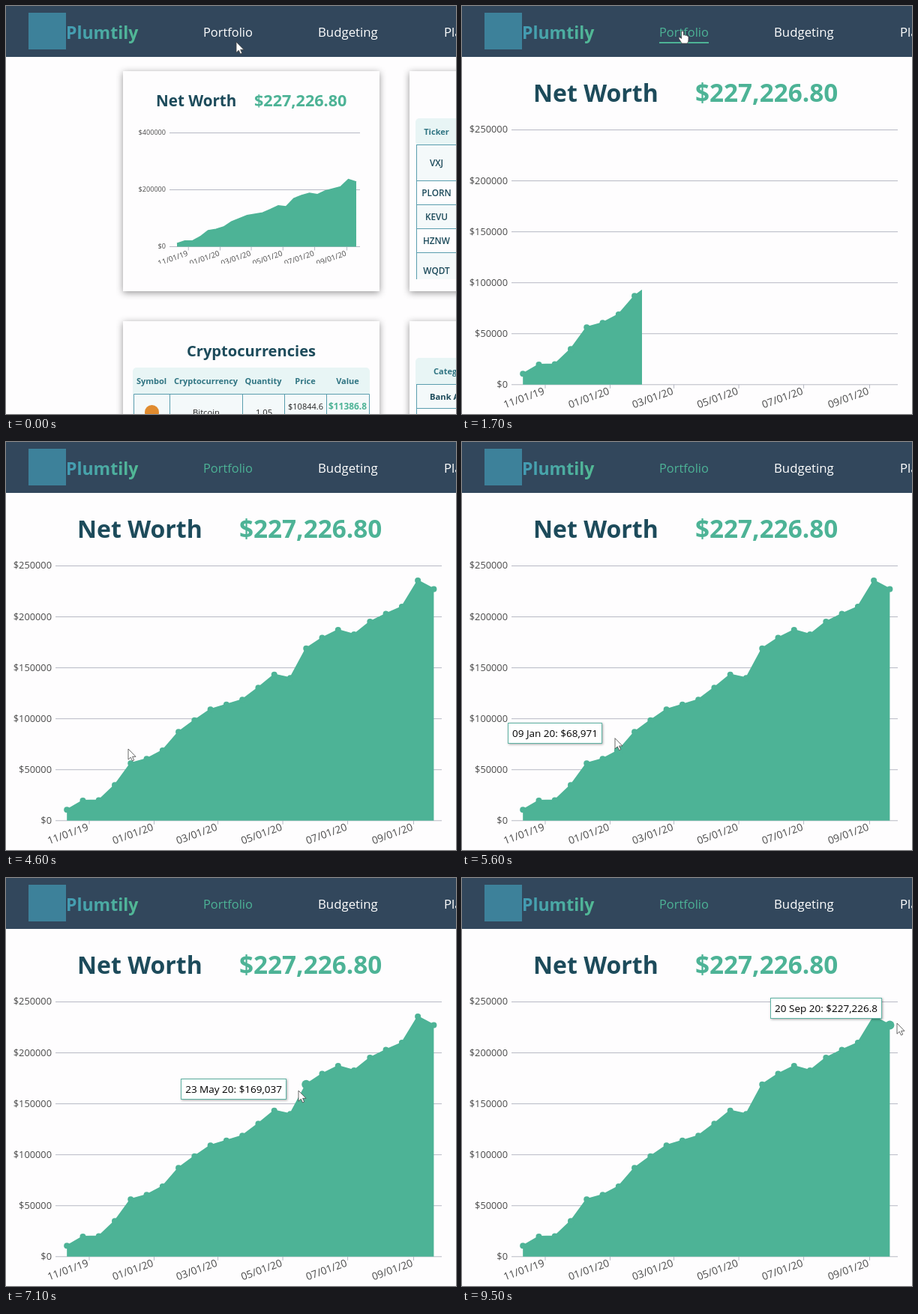
These frames come from a looping animation (600x545 px, 9.6 s). An HTML page:

```html
<!DOCTYPE html>
<html lang="en">
<head>
<meta charset="utf-8">
<title>Net worth dashboard</title>
<style>
  html, body { margin: 0; width: 100%; height: 100%; overflow: hidden; background: #fefdfe; }
  #stage { position: relative; width: 600px; height: 545px; overflow: hidden;
    font-family: "Open Sans", "Noto Sans", sans-serif; }
  svg { position: absolute; left: 0; top: 0; }
  .card { filter: drop-shadow(0 2px 5px rgba(0, 0, 0, .42)); }
  #tip { position: absolute; box-sizing: border-box; height: 28px; padding: 0 5px;
    border: 1px solid #5fb3a4; background: #fff; box-shadow: 1px 1px 3px rgba(0, 0, 0, .35);
    font-size: 13.5px; line-height: 26px; color: #000; white-space: nowrap; }
  #pointer path { fill: #fff; stroke: #444; stroke-width: .8; }
</style>
</head>
<body>
<div id="stage">
  <svg id="page" width="600" height="545"></svg>
  <div id="tip"></div>
  <svg id="pointer" width="600" height="545">
    <path id="arrow" d="M0 0V14.2L3.3 11.2 5.5 16 7.7 15 5.6 10.3H10Z"/>
    <path id="hand" d="M-1.3 1.2Q0-.6 1.4 1.2V6Q3 5 4 6.3 5.4 5.6 6.2 7 8 6.7 8 8.6V12Q8 14.5 6.5 17H-1Q-2.5 14-4.6 11 -5.8 9 -4 8.7L-1.3 10.4Z"/>
  </svg>
</div>
<script>
const LOOP = 9600, STEP = 100;
const PAPER = '#fefdfe', GREEN = '#4db396', DARK = '#1d4b5b', TEAL = '#2f7482', GRID = '#b7b9c4', LINE = '#5a9dae';
const $ = id => document.getElementById(id);

const worth = [10662, 19706, 20000, 34926, 56250, 60662, 68971, 87132, 98529, 109191, 113888, 118750,
  130515, 143382, 140074, 169037, 179412, 187132, 182721, 195221, 202941, 209926, 235662, 227226.8];
// Days from the first sample to each labelled month
const ticks = { '11/01/19': 22, '01/01/20': 83, '03/01/20': 143, '05/01/20': 204, '07/01/20': 265, '09/01/20': 327 };
const months = 'Jan Feb Mar Apr May Jun Jul Aug Sep Oct Nov Dec'.split(' ');

const big = { x: 81.2, gap: 21.27, zero: 505.8, top: 165.5, max: 250000, step: 50000,
  left: 66, right: 581, font: 12.8, tickFont: 13.7, drop: 12.3, shift: -1.4 };
const small = { x: 228, gap: 10.39, zero: 321.5, top: 169.5, max: 400000, step: 200000,
  left: 218, right: 472, font: 9.1, tickFont: 10, drop: 11.5, shift: 0 };

const text = (x, y, size, str, fill = '#111', anchor = 'start', weight = 400, extra = '') =>
  `<text x="${x}" y="${y}" font-size="${size}" fill="${fill}" text-anchor="${anchor}" font-weight="${weight}" ${extra}>${str}</text>`;
const rect = (x, y, w, h, fill, extra = '') =>
  `<rect x="${x}" y="${y}" width="${w}" height="${h}" fill="${fill}" ${extra}/>`;
const path = (d, stroke, width = 1) => `<path d="${d}" fill="none" stroke="${stroke}" stroke-width="${width}"/>`;

const px = (c, i) => c.x + c.gap * i;
const py = (c, v) => c.zero - (c.zero - c.top) * v / c.max;

function axes(c) {
  let out = '';
  for (let v = 0; v <= c.max; v += c.step) {
    const y = py(c, v);
    out += path(`M${c.left} ${y}H${c.right}`, GRID)
      + text(c.left - 5, y + c.font * .31, c.font, '$' + v, '#4a4a4a', 'end');
  }
  for (const [label, day] of Object.entries(ticks)) {
    const x = px(c, day / 15) + c.shift, y = c.zero + c.drop;
    out += path(`M${x} ${c.zero}v5`, GRID)
      + text(x, y, c.tickFont, label, '#4a4a4a', 'end', 400, `transform="rotate(-20 ${x} ${y})"`);
  }
  return out;
}

function area(c) {
  const line = worth.map((v, i) => `${px(c, i)} ${py(c, v)}`).join('L');
  return `<path d="M${line}V${c.zero}H${c.x}Z" fill="${GREEN}"/>` + path('M' + line, GREEN, 2);
}

function nav() {
  return rect(0, 0, 600, 68, '#32475c')
    + rect(30, 9, 50, 49, '#3d819a')
    + text(80, 44, 23, 'Plumtily', 'url(#brand)', 'start', 700)
    + text(263, 41, 16.4, 'Portfolio', '#fff', 'start', 400, 'id="link"')
    + rect(263, 48, 66, 2, GREEN, 'id="under"')
    + text(416, 41, 16.8, 'Budgeting', '#fff')
    + text(584, 41, 16.8, 'Planning', '#fff');
}

function tickerTable() {
  const edges = [185, 233, 265, 297, 329, 378];
  const rows = ['VXJ', 'PLORN', 'KEVU', 'HZNW', 'WQDT'].map((name, i) => {
    const y = edges[i], h = edges[i + 1] - y;
    return rect(547.5, y + .5, 80, h, i % 2 ? PAPER : '#f4f9fa', `stroke="${LINE}"`)
      + text(574, y + h / 2 + 4.5, 11.8, name, DARK, 'middle', 600);
  }).join('');
  return rect(546, 150, 90, 36, '#e8f5f5', 'rx="5"')
    + text(574, 172, 11, 'Ticker', TEAL, 'middle', 700)
    + `<g clip-path="url(#rows)">${rows}</g>`;
}

function cryptoTable() {
  const heads = [['Symbol', 194], ['Cryptocurrency', 266.5], ['Quantity', 343], ['Price', 399], ['Value', 455.5]];
  return text(327, 467.5, 20.1, 'Cryptocurrencies', DARK, 'middle', 700)
    + rect(169, 483, 316, 40, '#e8f5f5', 'rx="5"')
    + rect(170, 518, 314, 40, '#f4f9fa')
    + heads.map(([name, x]) => text(x, 505, 11, name, TEAL, 'middle', 700)).join('')
    + path('M170.5 545V518.5H484.5V545M218.5 518V545M315.5 518V545M371.5 518V545M427.5 518V545', LINE)
    + '<circle cx="194.5" cy="542.5" r="9.5" fill="#e08b2f"/>'
    + text(267, 547, 11.2, 'Bitcoin', '#222', 'middle')
    + text(344, 547, 11.2, '1.05', '#222', 'middle')
    + text(399.5, 539, 11, '$10844.6', '#222', 'middle')
    + text(455.5, 539, 11.9, '$11386.8', GREEN, 'middle', 700);
}

function categoryTable() {
  return rect(546, 470, 90, 40, '#e8f5f5', 'rx="5"')
    + text(570, 492, 11, 'Category', TEAL, 'start', 700)
    + rect(547.5, 505.5, 90, 32, '#f4f9fa', `stroke="${LINE}"`)
    + rect(547.5, 537.5, 90, 32, PAPER, `stroke="${LINE}"`)
    + text(565, 525.5, 11.2, 'Bank Accounts', DARK, 'start', 700);
}

function dashboard() {
  const cards = [[156, 87], [538, 87], [156, 421], [538, 421]]
    .map(([x, y]) => rect(x, y, 342, 294, PAPER, 'class="card"')).join('');
  return cards
    + text(200, 134, 20.6, 'Net Worth', DARK, 'start', 700)
    + text(331, 134, 21.6, '$227,226.80', GREEN, 'start', 700)
    + `<g clip-path="url(#smallPlot)">${axes(small)}${area(small)}</g>`
    + tickerTable() + cryptoTable() + categoryTable();
}

function portfolio() {
  const dots = worth.map((v, i) => `<circle class="dot" cx="${px(big, i)}" cy="${py(big, v)}" r="4" fill="${GREEN}"/>`).join('');
  return text(95, 128, 32, 'Net Worth', DARK, 'start', 700)
    + text(311, 128, 33.3, '$227,226.80', GREEN, 'start', 700)
    + axes(big) + `<g clip-path="url(#reveal)">${area(big)}${dots}</g>`;
}

$('page').innerHTML = `<defs>
  <linearGradient id="brand" gradientUnits="userSpaceOnUse" x1="80" x2="176" y1="0" y2="0">
    <stop stop-color="#439bb4"/><stop offset="1" stop-color="#52b994"/></linearGradient>
  <clipPath id="reveal"><rect id="wipe" x="66" y="150" width="0" height="356"/></clipPath>
  <clipPath id="smallPlot"><rect x="160" y="150" width="330" height="194"/></clipPath>
  <clipPath id="rows"><rect x="540" y="180" width="60" height="185"/></clipPath></defs>
  <g id="home">${dashboard()}</g><g id="detail">${portfolio()}</g>${nav()}`;
const dots = [...document.querySelectorAll('.dot')];

// Time, x, y
const pointerTrack = [[0, 307, 48], [300, 305, 45], [600, 298, 37], [1000, 294, 33], [3800, 294, 33],
  [4200, 240, 170], [4600, 163, 410], [5000, 162, 419], [5300, 162, 419], [6200, 288, 349],
  [6300, 299, 346], [7100, 390, 284], [7300, 412, 290], [8300, 517, 246], [8600, 545, 232], [9200, 580, 194]];
// Time, right edge, bottom edge
const tipTrack = [[5400, 162, 421], [6200, 262, 348], [6300, 271, 342], [7100, 374, 295.5],
  [7300, 400, 259], [8300, 497, 218], [9200, 560, 188]];

function at(track, t) {
  const n = track.findIndex(k => k[0] > t);
  if (n < 0) return track[track.length - 1].slice(1);
  if (n === 0) return track[0].slice(1);
  const a = track[n - 1], b = track[n], f = (t - a[0]) / (b[0] - a[0]);
  return [a[1] + (b[1] - a[1]) * f, a[2] + (b[2] - a[2]) * f];
}

function tipText(i) {
  const d = new Date(Date.UTC(2019, 9, 11 + 15 * i));
  const day = String(d.getUTCDate()).padStart(2, '0');
  return `${day} ${months[d.getUTCMonth()]} ${d.getUTCFullYear() % 100}: $${worth[i].toLocaleString('en-US')}`;
}

const show = (el, on) => { el.style.display = on ? '' : 'none'; };

function draw(t) {
  const [x, y] = at(pointerTrack, t);
  const opened = t >= 1100, hover = t >= 400 && y < 45;
  show($('home'), !opened);
  show($('detail'), opened);
  show($('under'), hover);
  $('link').setAttribute('fill', hover || opened ? GREEN : '#fff');

  const p = Math.min(1, Math.max(0, (t - 1200) / 1200));
  $('wipe').setAttribute('width', 515 * (.675 * p + .325 * p * p));

  show($('arrow'), !hover);
  show($('hand'), hover);
  const move = `translate(${x} ${y})`;
  $('arrow').setAttribute('transform', move);
  $('hand').setAttribute('transform', move);

  const active = t < 5400 ? -1 : Math.min(23, Math.round((x - big.x) / big.gap));
  dots.forEach((dot, i) => dot.setAttribute('r', i === active ? 6 : 4));
  show($('tip'), active >= 0);
  if (active >= 0) {
    const [right, bottom] = at(tipTrack, t);
    $('tip').textContent = tipText(active);
    $('tip').style.right = 600 - right + 'px';
    $('tip').style.bottom = 545 - bottom + 'px';
  }
}

const start = performance.now();
function tick(now) {
  const t = Math.max(0, now - start) % LOOP;
  draw(Math.floor(t / STEP) * STEP);
  requestAnimationFrame(tick);
}
draw(0);
requestAnimationFrame(tick);
</script>
</body>
</html>
```
